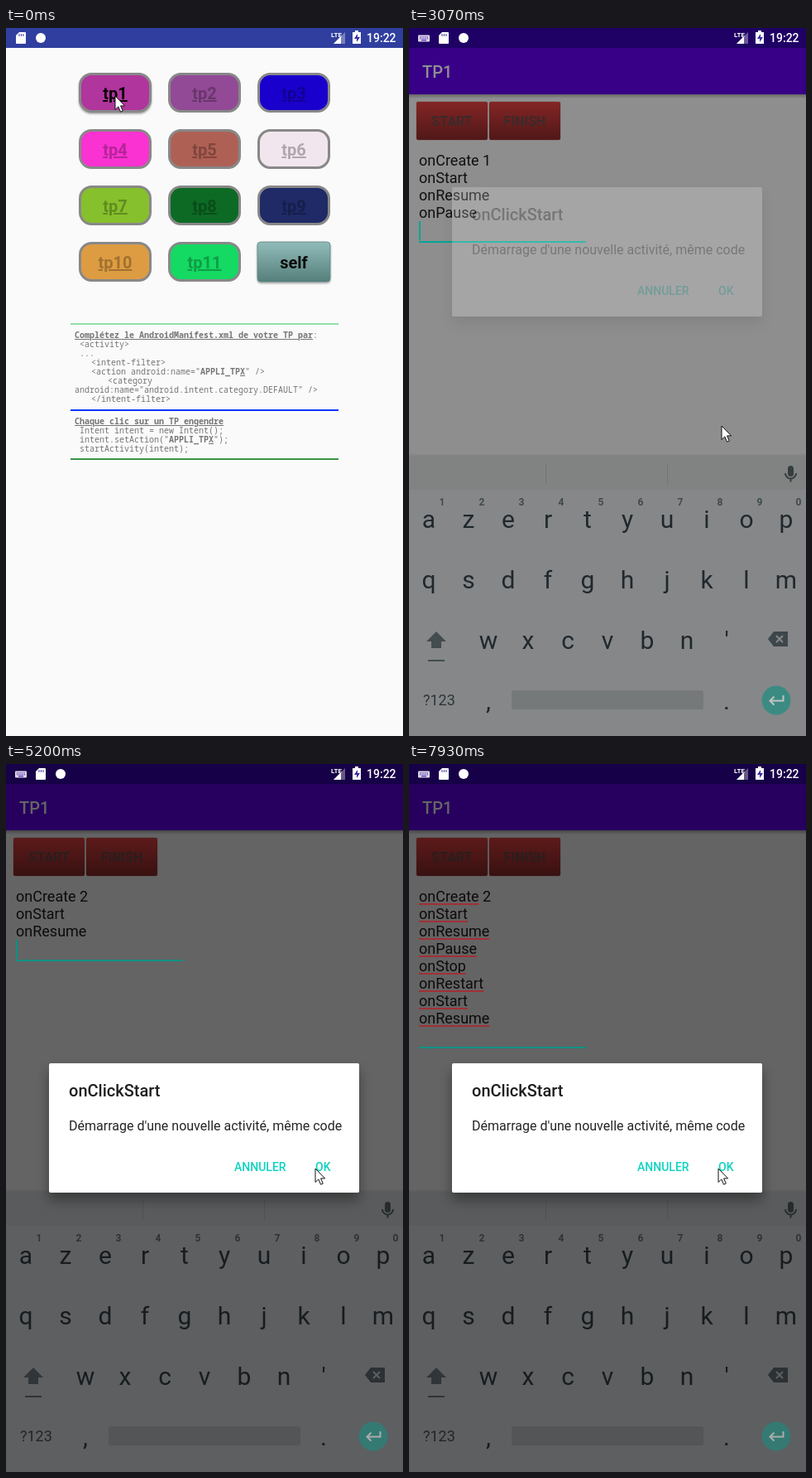
Write an HTML page that moves like this. It is 480x854 px and loops after 8 s.

```html
<!DOCTYPE html>
<html lang="fr">
<head>
<meta charset="utf-8">
<title>TP1</title>
<style>
html, body { margin: 0; width: 100%; height: 100%; overflow: hidden; background: #fafafa; }
svg { display: block; width: 100vw; height: 100vh; font-family: Roboto, sans-serif; }
text { white-space: pre; }
.mono { font: 10px "Noto Sans Mono", monospace; fill: #757575; }
.b { font-weight: 700; }
.m { font-weight: 500; }
.u { text-decoration: underline; }
.c { text-anchor: middle; }
.key { font-size: 30px; fill: #37474f; text-anchor: middle; }
.hint { font-size: 12px; font-weight: 700; fill: #6f8188; text-anchor: middle; }
</style>
</head>
<body>
<svg id="stage" viewBox="0 0 480 854" preserveAspectRatio="none"></svg>
<script>
const LOOP = 8000;
const stage = document.getElementById('stage');
const $ = id => document.getElementById(id);

const rect = (x, y, w, h, fill, extra = '') =>
  `<rect x="${x}" y="${y}" width="${w}" height="${h}" fill="${fill}" ${extra}/>`;
const text = (x, y, s, cls = '', extra = '') =>
  `<text x="${x}" y="${y}" class="${cls}" ${extra}>${s}</text>`;
const esc = s => s.replace(/</g, '&lt;').replace(/>/g, '&gt;');

// ---- Launcher screen ----
function homeScreen() {
  const fills = ['#b0369c', '#924a96', '#1a00cd', '#fa32d2', '#af6055', '#f2e6ee',
    '#86c02c', '#0d6a24', '#1f2a66', '#de9c42', '#14d962'];
  let s = rect(0, 0, 480, 854, '#fafafa') + rect(0, 0, 480, 24, '#303f9f');
  for (let i = 0; i < 12; i++) {
    const x = 88 + i % 3 * 108, y = 54 + Math.floor(i / 3) * 68;
    if (i === 11) {
      s += rect(x, y, 88, 48, 'url(#teal)', 'rx="4" stroke="#5f8582" stroke-width=".8" filter="url(#lift)"') +
        text(x + 44, y + 32, 'self', 'b c', 'font-size="20" fill="#0c0c0c"');
      continue;
    }
    const on = i === 0;
    s += rect(x + 1.5, y + 1.5, 85, 45, fills[i],
      `rx="14" stroke="#888" stroke-width="3" ${on ? 'id="tp1" filter="url(#lift)"' : ''}`) +
      text(x + 44, y + 32, 'tp' + (i + 1), 'b c u', `font-size="20" fill="#000" opacity="${on ? 0.95 : 0.27}"`);
  }
  s += rect(78, 356, 324, 2, '#90dfa8') + rect(78, 460, 324, 2, '#0b35ff') + rect(78, 519, 324, 2, '#3a9443');
  const action = 'APPLI_TP<tspan class="u">X</tspan>';
  const bold = h => `<tspan class="b">${h}</tspan>`;
  const head = h => `<tspan class="b u">${h}</tspan>`;
  const code = [
    [83, 374, head('Complétez le AndroidManifest.xml de votre TP par') + ':'],
    [89, 385, esc('<activity>')],
    [89, 396, '...'],
    [103, 407, esc('<intent-filter>')],
    [103, 418, esc('<action android:name="') + bold(action) + esc('" />')],
    [123, 429, esc('<category')],
    [83, 440, esc('android:name="android.intent.category.DEFAULT" />')],
    [103, 451, esc('</intent-filter>')],
    [83, 478, head('Chaque clic sur un TP engendre')],
    [89, 489, 'Intent intent = new Intent();'],
    [89, 500, 'intent.setAction("' + bold(action) + '");'],
    [89, 511, 'startActivity(intent);']
  ];
  return s + code.map(([x, y, h]) => text(x, y, h, 'mono')).join('');
}

// ---- Activity screen: body below the dim layer, accents above it ----
const LOG = ['onCreate', 'onStart', 'onResume', 'onPause', 'onStop', 'onRestart', 'onStart', 'onResume'];

function activityBody(n) {
  const button = (x, label) =>
    rect(x, 89, 86, 46, 'url(#red)', `rx="2" id="${label}${n}" stroke="#a44" stroke-opacity=".4" stroke-width=".6"`) +
    text(x + 43, 118, label, 'b c', 'font-size="16" fill="#6b4a4c"');
  return `<g id="body${n}">` + rect(0, 0, 480, 854, '#fafafa') +
    rect(0, 80, 480, 5, 'url(#barShade)') + rect(0, 0, 480, 80, '#6200ee') + rect(0, 0, 480, 24, '#3700b3') +
    text(16, 60, 'TP1', 'm', 'font-size="20" fill="#fff"') +
    button(9, 'START') + button(97, 'FINISH') +
    LOG.map((w, i) => text(12, 166 + 21 * i, `<tspan id="w${n}_${i}">${w}</tspan>${i ? '' : ' ' + n}`, '',
      `id="l${n}_${i}" font-size="18" fill="#1c1c1c"`)).join('') + '</g>';
}
const activityAccents = n => `<g id="acc${n}">` +
  rect(12, 236, 202, 2, '#03dac5', `id="line${n}"`) +
  rect(12, 212, 2, 23, '#03dac5', `id="caret${n}"`) +
  `<path id="spell${n}" stroke="#f04850" stroke-width="2"/></g>`;

// ---- Keyboard ----
function keyboard() {
  let s = rect(0, 513, 480, 4, 'url(#kbShade)') + rect(0, 517, 480, 41, '#e3e5e6') + rect(0, 557, 480, 297, '#eceff1') +
    rect(165, 526, 1, 24, '#c8cdd0') + rect(312, 526, 1, 24, '#c8cdd0');
  [['azertyuiop', 24, 603], ['qsdfghjklm', 24, 676], ["wxcvbn'", 96, 749]].forEach(([row, x0, y]) =>
    [...row].forEach((ch, i) => { s += text(x0 + 48 * i, y, ch, 'key'); }));
  [...'1234567890'].forEach((d, i) => { s += text(40 + 48 * i - (i === 9 ? 1 : 0), 576, d, 'hint'); });
  return s + text(96, 822, ',', 'key') + text(384, 822, '.', 'key') +
    text(17, 817, '?123', '', 'font-size="18" fill="#4f5f66"') +
    rect(124, 799, 232, 23, '#d1d5d7', 'rx="3"') +
    '<path d="M33 728l12 12h-6v8h-12v-8h-6z" fill="#76868c"/>' + rect(23, 762, 20, 2, '#76868c') +
    '<path d="M441 728h17v18h-17l-7-9z" fill="#6c7c83"/><path d="M444 733l8 8m0-8l-8 8" stroke="#eceff1" stroke-width="2"/>' +
    rect(458, 528, 7, 13, '#5f6b70', 'rx="3.5"') +
    '<path d="M455 537a6.5 6.5 0 0 0 13 0M461.500 543.500v4" fill="none" stroke="#5f6b70" stroke-width="2"/>';
}

const enterKey = '<circle cx="444" cy="811" r="17.500" fill="#4db6ac"/>' +
  '<path d="M452.500 805v6.500h-16m5-5l-5 5l5 5" fill="none" stroke="#fff" stroke-width="2"/>';

// ---- Status bar icons ----
const statusIcons = `
  <g id="kbIcon">${rect(11, 8.500, 14, 8, '#fff', 'rx="1" opacity=".85"')}
    <path d="M13 10.800h10M13 12.800h10" stroke="#3700b3" stroke-dasharray="1.200 1"/><path d="M15 14.800h6" stroke="#3700b3"/></g>
  <g id="icons"><path d="M16 5h7a1 1 0 0 1 1 1v12a1 1 0 0 1-1 1h-10a1 1 0 0 1-1-1v-9z" fill="#fff"/>
    <path d="M16 7v3M18.500 7v3M21 7v3" stroke="#5a55b0" stroke-width="1.200"/>
    <circle cx="42" cy="12" r="6" fill="#fff"/></g>
  ${text(393, 11, 'LTE', 'b', 'font-size="8" textLength="0" fill="#fff"').replace('textLength="0" ', '')}
  <path d="M410 5v14h-14z" fill="#fff" opacity=".35"/><path d="M405 10v9h-9z" fill="#fff"/>
  <path d="M422 3h4v2h3v14h-10v-14h3z" fill="#fff"/><path d="M425 7l-4 6h3v4l4-6h-3z" fill="#3a2ba8"/>
  ${text(436, 17, '19:22', 'm', 'font-size="14" fill="#fff"')}`;

const dialog = rect(52, 361, 375, 156, '#fff', 'rx="2" filter="url(#float)"') +
  rect(360, 468, 46, 36, '#000', 'rx="2" id="okPress" opacity="0"') +
  text(76, 401, 'onClickStart', 'm', 'font-size="20" fill="#1f1f1f"') +
  text(76, 442, "Démarrage d'une nouvelle activité, même code", '', 'font-size="16" fill="#252525"') +
  text(276, 491, 'ANNULER', 'm', 'font-size="14" fill="#0fd3c0"') +
  text(374, 491, 'OK', 'm', 'font-size="14" fill="#0fd3c0"');

const toast = rect(180, 746, 120, 44, '#5c5c5c', 'rx="22" opacity=".97"') +
  text(240, 774, 'APPLI_TP1', 'c', 'font-size="14" fill="#fff"');

const grad = (id, stops) => `<linearGradient id="${id}" x2="0" y2="1">` +
  stops.map(([c, o], i) => `<stop offset="${i}" stop-color="${c}" stop-opacity="${o}"/>`).join('') + '</linearGradient>';
const shadow = (id, dy, dev, o) => `<filter id="${id}" x="-20%" y="-30%" width="140%" height="170%">
  <feDropShadow dx="0" dy="${dy}" stdDeviation="${dev}" flood-opacity="${o}"/></filter>`;

stage.innerHTML = '<defs>' +
  grad('teal', [['#92bcb9', 1], ['#557f7b', 1]]) + grad('red', [['#ea4141', 1], ['#8e2a2a', 1]]) +
  grad('barShade', [['#000', 0.28], ['#000', 0]]) + grad('kbShade', [['#000', 0], ['#000', 0.1]]) +
  shadow('lift', 1.5, 1.2, 0.4) + shadow('float', 9, 8, 0.38) + '</defs>' +
  `<g id="home">${homeScreen()}</g>` + [1, 2, 3].map(activityBody).join('') +
  `<g id="kb">${keyboard()}</g>` + rect(0, 0, 480, 854, '#000', 'id="dim"') +
  `<g id="accents">${[1, 2, 3].map(activityAccents).join('')}<g id="enter">${enterKey}</g></g>` +
  `<g id="dialog">${dialog}</g><g id="toast">${toast}</g><g>${statusIcons}</g>` +
  '<path id="cursor" d="M0 0v16.500l3.800-3.600 2.700 6.300 2.800-1.200-2.700-6.100h5z" fill="#fff" stroke="#111" stroke-width="1"/>';

// ---- Timing ----
const ramp = (t, a, b) => Math.min(1, Math.max(0, (t - a) / (b - a)));
const within = (t, a, b) => t >= a && t < b;
const set = (id, k, v) => $(id).setAttribute(k, v);
const shift = (id, y) => set(id, 'transform', `translate(0 ${y})`);

const DIALOGS = [[1895, 3010], [4220, 5400], [7150, 9e9]];
const PATH = [
  [60, 132, 82], [75, 160, 74], [130, 143, 76], [1190, 143, 76], [1270, 97, 114],
  [1460, 97, 114], [1600, 70, 114], [2200, 70, 114], [2680, 378, 480], [3250, 378, 480],
  [3750, 69, 125], [4330, 69, 125], [4800, 371, 469], [5000, 374, 488], [5560, 374, 488],
  [5980, 153, 113], [6520, 153, 113], [6840, 72, 115], [7300, 72, 115], [7740, 361, 490], [7930, 374, 488]
];

function cursorAt(t) {
  const i = PATH.findIndex(p => p[0] > t);
  if (i < 1) return PATH[i ? PATH.length - 1 : 0].slice(1);
  const [t0, x0, y0] = PATH[i - 1], [t1, x1, y1] = PATH[i];
  let k = (t - t0) / (t1 - t0);
  k = k * k * (3 - 2 * k);
  return [x0 + (x1 - x0) * k, y0 + (y1 - y0) * k];
}

function pose(n, alpha, dy, cover = 0) {
  set('body' + n, 'opacity', alpha);
  set('acc' + n, 'opacity', alpha * (1 - cover));
  shift('body' + n, dy);
  shift('acc' + n, dy);
}

function showLog(n, count, caret, spell) {
  let d = '';
  LOG.forEach((_, i) => {
    set(`l${n}_${i}`, 'visibility', i < count ? 'visible' : 'hidden');
    if (spell && i < count) d += `M12 ${169 + 21 * i}h${$(`w${n}_${i}`).getComputedTextLength()}`;
  });
  set('spell' + n, 'd', d);
  shift('line' + n, 21 * (count - 3));
  shift('caret' + n, 21 * (count - 3));
  set('caret' + n, 'opacity', caret ? 1 : 0);
}

const press = (id, on) => set(id, 'fill', on ? '#f44343' : 'url(#red)');
const enter = (t, at) => [ramp(t, at, at + 200), 70 * (1 - ramp(t, at, at + 350)) ** 5];

function draw(t) {
  set('tp1', 'fill', within(t, 270, 480) ? '#96308a' : '#b0369c');

  const [a1, y1] = enter(t, 500), [a2, y2] = enter(t, 3200), [a3, y3] = enter(t, 5580);
  const leave = ramp(t, 6330, 6500);
  const over3 = a3 * (1 - leave);
  pose(1, a1, y1, a2);
  pose(2, a2, y2, over3);
  pose(3, over3, y3 + 70 * leave * leave);
  showLog(1, t < 2940 ? 3 : 4, true, false);
  showLog(2, t < 5340 ? 3 : t < 6200 ? 4 : 8, t < 6200, t > 6620);
  showLog(3, 3, false, false);
  press('START1', within(t, 1720, 1850));
  press('START2', within(t, 4020, 4170) || within(t, 6960, 7090));
  press('FINISH3', within(t, 6060, 6220));

  const slide = 340 * (1 - ramp(t, 680, 950)) ** 2;
  shift('kb', slide);
  shift('enter', slide);
  set('kbIcon', 'opacity', t > 800 ? 1 : 0);
  set('icons', 'transform', `translate(${t > 800 ? 24 : 0} 0)`);

  let dim = 0, alpha = 0, dy = 0;
  for (const [a, b] of DIALOGS) {
    if (t < a) break;
    dim = 0.6 * ramp(t, a, a + 220) * (1 - ramp(t, b, b + 220));
    alpha = (1 - (1 - ramp(t, a, a + 150)) ** 4) * (1 - ramp(t, b, b + 150)) ** 3;
    dy = t > b - 70 ? -169 : 0;
  }
  set('dim', 'opacity', dim);
  $('accents').style.filter = `brightness(${1 - 0.55 * dim})`;
  set('dialog', 'opacity', alpha);
  shift('dialog', dy);
  set('okPress', 'opacity', within(t, 2800, 2950) || within(t, 5260, 5400) ? 0.1 : 0);

  set('toast', 'opacity', ramp(t, 620, 800) * (1 - ramp(t, 2600, 2850)));
  set('cursor', 'transform', `translate(${cursorAt(t).join(' ')})`);
}

function tick() {
  draw(performance.now() % LOOP);
  requestAnimationFrame(tick);
}
tick();
</script>
</body>
</html>
```
